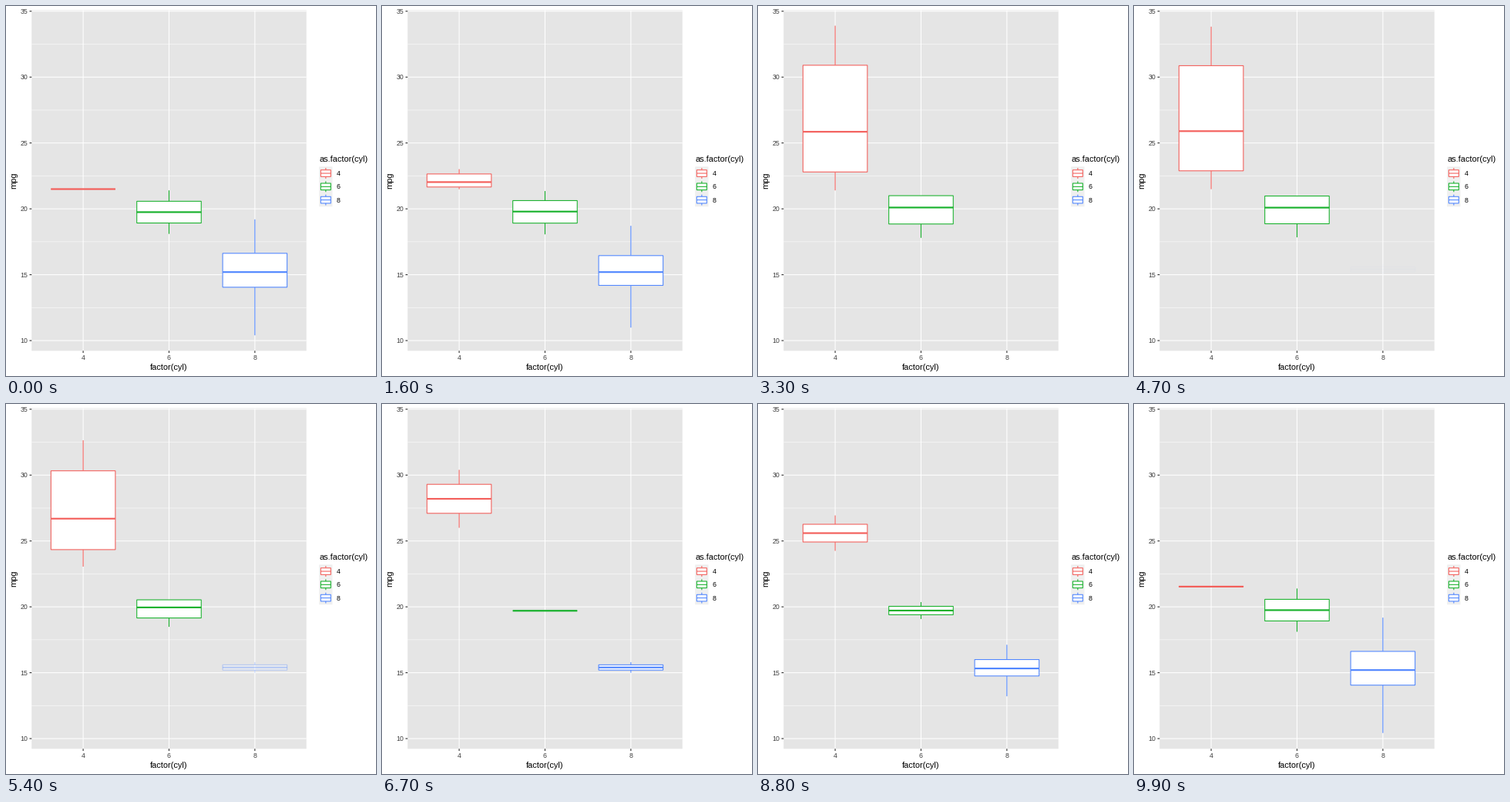
Animation, 480 px wide and 480 px high, one loop 10 s. Source, as a matplotlib script:

```python
import math

import matplotlib.pyplot as plt
from matplotlib.animation import FuncAnimation
from matplotlib.patches import Rectangle

SIZE, DPI = 480, 72  # at 72 dpi one point is one pixel
FRAMES, INTERVAL = 100, 100

LEFT, RIGHT, TOP, BOTTOM = 33.26, 389.7, 5.5, 447.3
Y_LOW, Y_HIGH = 9.225, 35.075
STEP = (RIGHT - LEFT) / 3.2
LINE, THICK = 1.07, 2.13

CYLS = ["4", "6", "8"]
COLORS = ["#F35E5A", "#17B12B", "#5086FF"]

# Per state and cylinder count: min, lower hinge, median, upper hinge, max
STATES = [
    [(21.5,) * 5,
     (18.1, 18.925, 19.75, 20.575, 21.4),
     (10.4, 14.05, 15.2, 16.625, 19.2)],
    [(21.4, 22.8, 25.85, 30.9, 33.9),
     (17.8, 18.85, 20.1, 21.0, 21.0),
     None],
    [(26.0, 27.1, 28.2, 29.3, 30.4),
     (19.7,) * 5,
     (15.0, 15.2, 15.4, 15.6, 15.8)],
]
# First and last frame of the move that leaves each state
MOVES = [(11, 33), (45, 67), (79, 100)]

plt.rcParams["font.family"] = "Liberation Sans"
plt.rcParams["path.snap"] = False

fig = plt.figure(figsize=(SIZE / DPI, SIZE / DPI), dpi=DPI, facecolor="white")
ax = fig.add_axes([0, 0, 1, 1])
ax.set_xlim(0, SIZE)
ax.set_ylim(SIZE, 0)
ax.axis("off")


def x_pos(i):
    return LEFT + STEP * (0.6 + i)


def y_pos(value):
    return BOTTOM - (value - Y_LOW) / (Y_HIGH - Y_LOW) * (BOTTOM - TOP)


def line(xs, ys, color, width=LINE, z=1):
    return ax.plot(xs, ys, color=color, lw=width, zorder=z, snap=False,
                   solid_capstyle="butt")[0]


def rect(x, y, w, h, face, edge="none", z=1):
    patch = Rectangle((x, y), w, h, facecolor=face, edgecolor=edge, lw=LINE,
                      joinstyle="miter", zorder=z, snap=False)
    return ax.add_patch(patch)


def label(x, y, text, size, color="black", **kw):
    ax.text(x, y, text, fontsize=size, color=color, va="baseline", **kw)


def draw_panel():
    rect(LEFT, TOP, RIGHT - LEFT, BOTTOM - TOP, "#E5E5E5", z=0)
    for k in range(5):
        y = y_pos(12.5 + 5 * k)
        line([LEFT, RIGHT], [y, y], "white", LINE / 2)
    for value in range(10, 36, 5):
        y = y_pos(value)
        line([LEFT, RIGHT], [y, y], "white")
        line([LEFT - 2.75, LEFT], [y, y], "#262626")
        label(LEFT - 4.95, y + 3.15, str(value), 8.8, "#404040", ha="right")
    for i, cyl in enumerate(CYLS):
        x = x_pos(i)
        line([x, x], [TOP, BOTTOM], "white")
        line([x, x], [BOTTOM, BOTTOM + 2.75], "#262626")
        label(x, 458.7, cyl, 8.8, "#404040", ha="center")
    label((LEFT + RIGHT) / 2, 472, "factor(cyl)", 11, ha="center")
    ax.text(13.6, (TOP + BOTTOM) / 2, "mpg", fontsize=11, rotation=90,
            rotation_mode="anchor", ha="center", va="baseline")


def draw_legend():
    x, top, key = 406.2, 208.4, 17.28
    label(x, 201.7, "as.factor(cyl)", 11)
    for i, (cyl, color) in enumerate(zip(CYLS, COLORS)):
        y = top + i * key
        mid = x + key / 2
        rect(x, y, key, key, "#EFEFEF", z=0)
        for a, b in ((0.1, 0.25), (0.75, 0.9)):
            line([mid, mid], [y + a * key, y + b * key], color)
        rect(x + key / 8, y + key / 4, key * 0.75, key / 2, "white", color, z=2)
        line([x + key / 8, x + key * 7 / 8], [y + key / 2] * 2, color, z=3)
        label(x + key + 5.5, y + key / 2 + 3.15, cyl, 8.8)


class Box:
    def __init__(self, i):
        color = COLORS[i]
        self.x = x_pos(i)
        half = STEP * 0.375
        self.whiskers = [line([self.x] * 2, [0, 0], color, z=4) for _ in range(2)]
        self.body = rect(self.x - half, 0, 2 * half, 0, "white", color, z=5)
        self.median = line([self.x - half, self.x + half], [0, 0], color, THICK, 6)
        self.parts = [*self.whiskers, self.body, self.median]

    def show(self, stats, alpha):
        for part in self.parts:
            part.set_visible(stats is not None)
            part.set_alpha(alpha)
        if stats is None:
            return
        low, q1, mid, q3, high = map(y_pos, stats)
        self.whiskers[0].set_ydata([high, q3])
        self.whiskers[1].set_ydata([q1, low])
        self.body.set_y(q3)
        self.body.set_height(q1 - q3)
        self.median.set_ydata([mid, mid])


def progress(frame):
    """Current state, next state and sine-eased share of the move."""
    if frame == 0:
        return 0, 1, 0.0
    for k, (start, end) in enumerate(MOVES):
        if frame < end:
            t = max(0, frame - start) / (end - start)
            return k, (k + 1) % 3, (1 - math.cos(math.pi * t)) / 2


def pose(old, new, p):
    if old is None:
        return (new, p) if p > 0 else (None, 1)
    if new is None:
        new = (old[2],) * 5  # a leaving box shrinks onto its median
    return [a + (b - a) * p for a, b in zip(old, new)], 1


draw_panel()
draw_legend()
boxes = [Box(i) for i in range(3)]


def update(frame):
    now, then, p = progress(frame)
    for box, old, new in zip(boxes, STATES[now], STATES[then]):
        box.show(*pose(old, new, p))
    return [part for box in boxes for part in box.parts]


anim = FuncAnimation(fig, update, frames=FRAMES, interval=INTERVAL,
                     repeat=True, repeat_delay=0)
plt.show()
```
